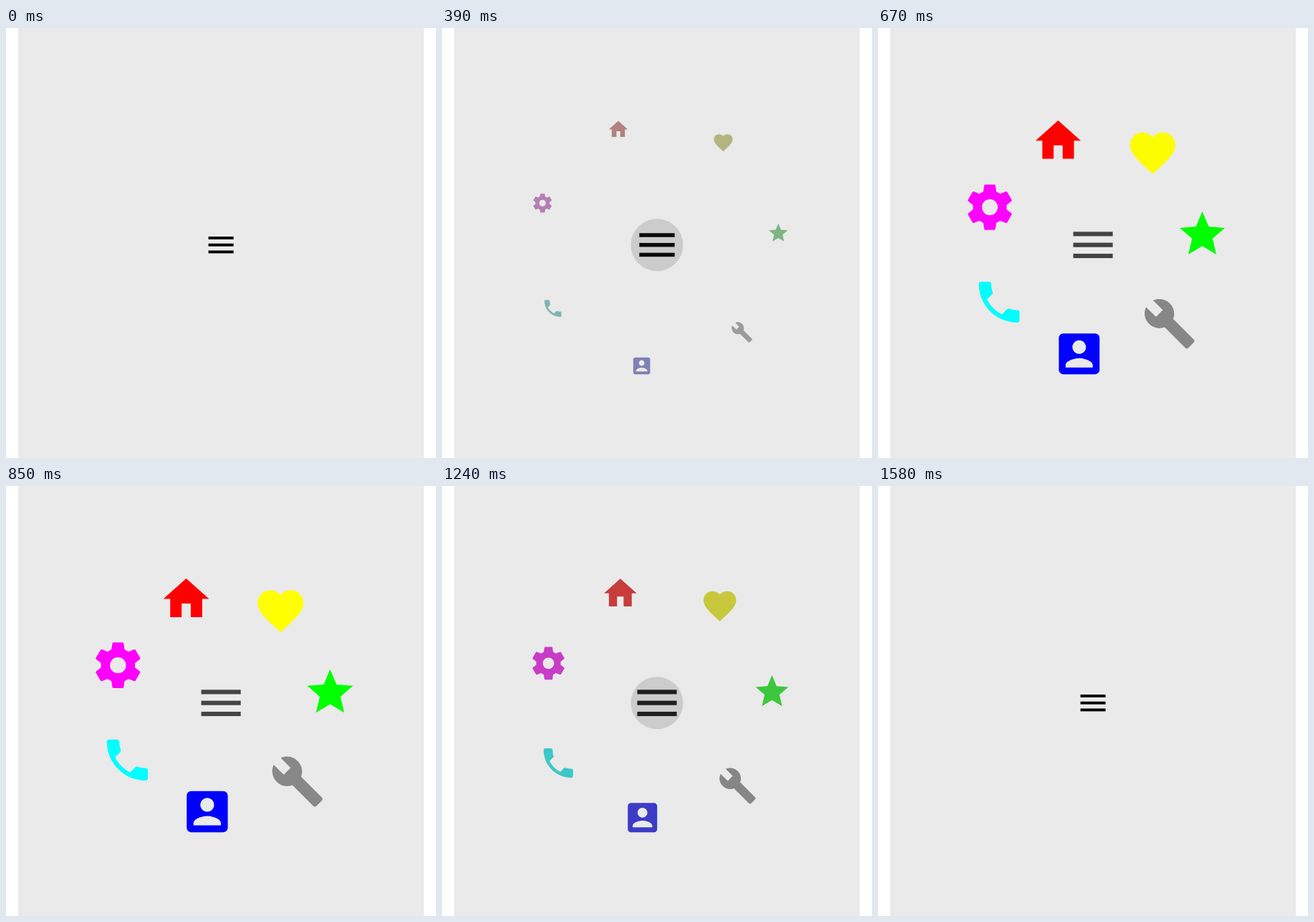
Write an HTML page with a canvas that moves like this. It is 600x600 px and loops after 1.64 s.

```html
<!DOCTYPE html>
<html lang="en">
<head>
<meta charset="utf-8">
<title>Radial menu</title>
<style>
  html, body { margin: 0; height: 100%; overflow: hidden; background: #fff; }
  canvas { display: block; }
</style>
</head>
<body>
<canvas id="stage" width="600" height="600"></canvas>
<script>
const ctx = document.getElementById('stage').getContext('2d');
const LOOP = 1640, CX = 300, CY = 302.7;
const OPEN = 277, CLOSE = 1156;

function gearPath() {
  const tooth = [[-2.87, -6.93], [-2.49, -9.58], [-2.2, -10], [2.2, -10], [2.49, -9.58], [2.87, -6.93]];
  const points = [];
  for (let k = 0; k < 6; k++) {
    const c = Math.cos(k * Math.PI / 3), s = Math.sin(k * Math.PI / 3);
    for (const [x, y] of tooth) points.push([12 + x * c - y * s, 12 + x * s + y * c]);
  }
  return 'M' + points.join('L') + 'ZM12 8.5a3.5 3.5 0 1 0 0 7 3.5 3.5 0 0 0 0-7z';
}

// Clockwise from the house, each drawn on a 24 x 24 grid
const icons = [
  [[255, 0, 0], 'M10 20v-6h4v6h5v-8h3L12 3 2 12h3v8z'],
  [[255, 255, 0], 'M12 21.35l-1.45-1.32C5.4 15.36 2 12.28 2 8.5 2 5.42 4.42 3 7.5 3c1.74 0 3.41.81 4.5 2.09C13.09 3.81 14.76 3 16.5 3 19.58 3 22 5.42 22 8.5c0 3.78-3.4 6.86-8.55 11.54z'],
  [[0, 255, 0], 'M12 17.27L18.18 21l-1.64-7.03L22 9.24l-7.19-.61L12 2 9.19 8.63 2 9.24l5.46 4.73L5.82 21z'],
  [[136, 136, 136], 'M22.7 19l-9.1-9.1c.9-2.3.4-5-1.5-6.9-2-2-5-2.4-7.4-1.3L9 6 6 9 1.6 4.7C.4 7.1.9 10.1 2.9 12.1c1.9 1.9 4.6 2.4 6.9 1.5l9.1 9.1c.4.4 1 .4 1.4 0l2.3-2.3c.5-.4.5-1.1.1-1.4z'],
  [[0, 0, 255], 'M3 5v14c0 1.1.89 2 2 2h14c1.1 0 2-.9 2-2V5c0-1.1-.9-2-2-2H5c-1.11 0-2 .9-2 2zm12 4c0 1.66-1.34 3-3 3s-3-1.34-3-3 1.34-3 3-3 3 1.34 3 3zm-9 8c0-2 4-3.1 6-3.1s6 1.1 6 3.1v1H6z'],
  [[0, 255, 255], 'M6.62 10.79c1.44 2.83 3.76 5.14 6.59 6.59l2.2-2.2c.27-.27.67-.36 1.02-.24 1.12.37 2.33.57 3.57.57.55 0 1 .45 1 1V20c0 .55-.45 1-1 1-9.39 0-17-7.61-17-17 0-.55.45-1 1-1h3.5c.55 0 1 .45 1 1 0 1.25.2 2.45.57 3.57.11.35.03.74-.25 1.02z'],
  [[255, 0, 255], gearPath()]
].map(([color, d]) => ({ color, shape: new Path2D(d) }));

const clamp = x => Math.min(1, Math.max(0, x));

// Same curve as the CSS keyword "ease"
function ease(x) {
  if (x <= 0 || x >= 1) return clamp(x);
  const bezier = (u, a, b) => 3 * u * (1 - u) * (1 - u) * a + 3 * u * u * (1 - u) * b + u ** 3;
  let lo = 0, hi = 1;
  for (let i = 0; i < 24; i++) {
    const mid = (lo + hi) / 2;
    if (bezier(mid, 0.25, 0.25) < x) lo = mid; else hi = mid;
  }
  return bezier(lo, 0.1, 1);
}

function drawIcon({ color, shape }, index, p) {
  const angle = (-18.5 + index * 360 / 7) * Math.PI / 180;
  const radius = 182 - 29 * p, scale = 76.5 / 24 * p;
  ctx.save();
  ctx.translate(CX + radius * Math.sin(angle), CY - radius * Math.cos(angle));
  ctx.scale(scale, scale);
  ctx.translate(-12, -12);
  const fade = p ** 0.9;
  ctx.globalAlpha = fade;
  ctx.fillStyle = `rgb(${color.map(v => Math.round(v * fade))})`;
  ctx.fill(shape, 'evenodd');
  ctx.restore();
}

function drawButton(t, p) {
  const grow = ease((t - 272) / 280) - ease((t - 1250) / 300);
  const unit = (46.7 + 26.8 * grow) / 24;
  const shade = Math.round(68 * p * p);
  ctx.fillStyle = `rgb(${shade},${shade},${shade})`;
  for (const row of [-5, 0, 5])
    ctx.fillRect(CX - 9 * unit, CY + (row - 1) * unit, 18 * unit, 2 * unit);

  // Press highlight
  const since = t - (t < 800 ? OPEN : CLOSE);
  const glow = clamp((since + 30) / 20) * clamp((270 - since) / 70);
  ctx.fillStyle = `rgba(0,0,0,${0.13 * glow})`;
  ctx.beginPath();
  ctx.arc(CX, CY, 36.5, 0, 2 * Math.PI);
  ctx.fill();
}

function draw(now) {
  const t = now % LOOP;
  const p = clamp(ease((t - OPEN) / 450) - ease((t - CLOSE) / 430));
  ctx.fillStyle = '#fff';
  ctx.fillRect(0, 0, 600, 600);
  ctx.fillStyle = '#eaeaea';
  ctx.fillRect(17, 0, 566, 600);
  if (p > 0.001) icons.forEach((icon, i) => drawIcon(icon, i, p));
  drawButton(t, p);
}

let start;
function tick(now) {
  start ??= now;
  draw(now - start);
  requestAnimationFrame(tick);
}
draw(0);
requestAnimationFrame(tick);
</script>
</body>
</html>
```
